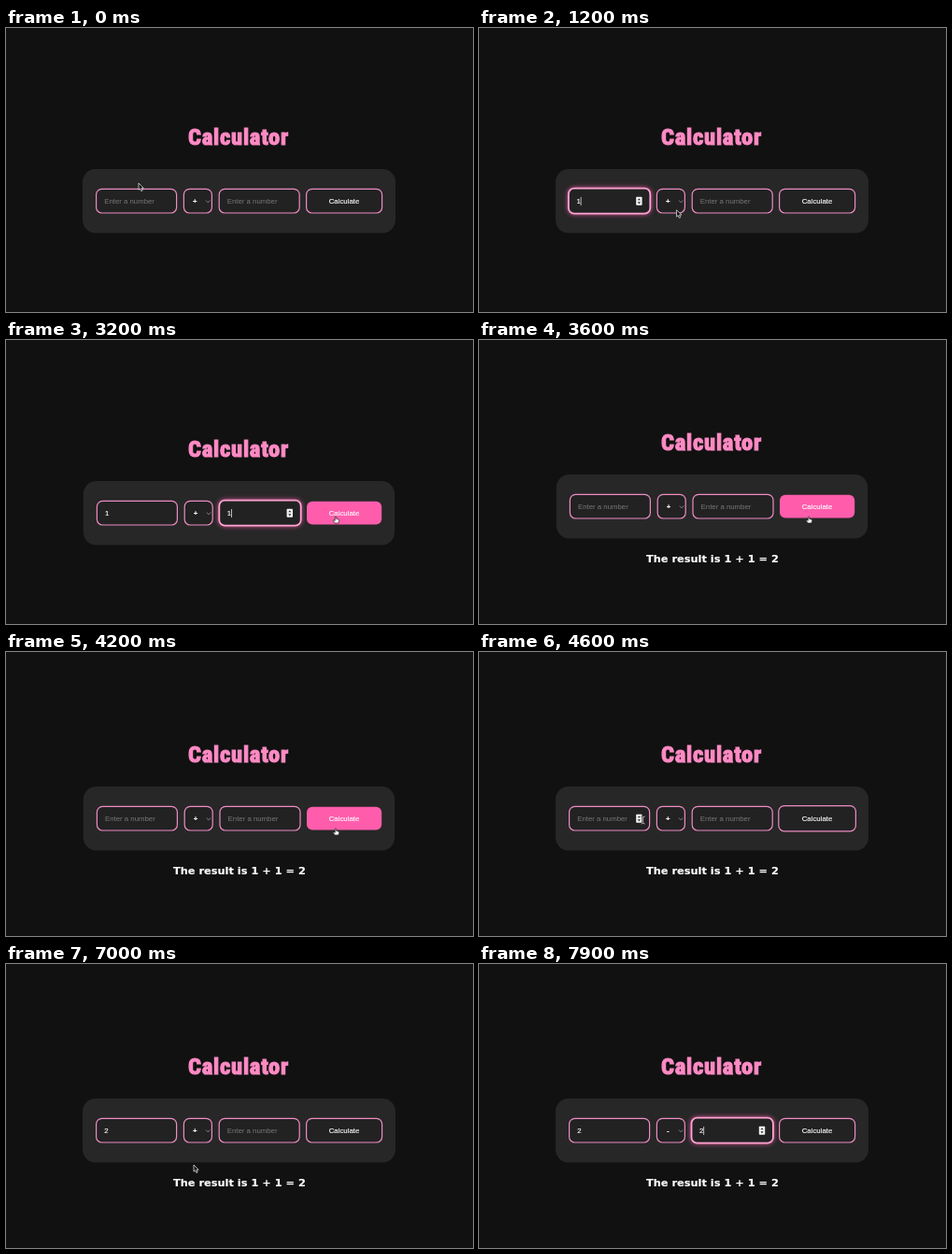
These frames come from a looping animation (500x304 px, 8 s). An HTML page:

```html
<!DOCTYPE html>
<html lang="en">
<head>
<meta charset="utf-8">
<title>Calculator</title>
<style>
  html, body { margin: 0; width: 100%; height: 100%; overflow: hidden; background: #111; }
  svg { display: block; width: 500px; height: 304px; }
  text { font: 7.8px "Liberation Sans", Arial, sans-serif; fill: #fff; stroke: #fff; stroke-width: .15; white-space: pre; }
  .title {
    font: 900 24.5px Impact, Anton, "Roboto Condensed", Roboto, sans-serif; font-stretch: 75%;
    fill: #ff8ac4; stroke: #ff8ac4; stroke-width: 1.2;
  }
  .panel { fill: #272727; }
  .box { fill: #222; stroke: #ee8cc2; stroke-width: 1.2; }
  .hint { fill: #777; stroke: none; }
  .focus .box { stroke: #ffa3d3; stroke-width: 1.8; filter: drop-shadow(0 0 2.5px rgba(255, 95, 174, .8)); }
  .hover .box { fill: #ff5dac; stroke: none; }
  .mid { text-anchor: middle; }
  .op { font-weight: bold; }
  .result { font: bold 11.35px "DejaVu Sans", Verdana, sans-serif; text-anchor: middle; }
  .chevron { fill: none; stroke: #909090; stroke-width: .9; }
  .hide { display: none; }
</style>
</head>
<body>
<svg viewBox="0 0 500 304">
  <defs>
    <g id="spinner">
      <rect width="6.4" height="9" rx=".8" fill="#f2f2f2"/>
      <path d="M1.6 3.5 3.2 1.6 4.8 3.5zM1.6 5.5 3.2 7.4 4.8 5.5z" fill="#222"/>
    </g>
    <path id="bar" d="M-2-4Q0-4 0-2.6Q0-4 2-4M0-2.6V2.6M-2 4Q0 4 0 2.6Q0 4 2 4"/>
  </defs>
  <g id="app">
    <text class="title" id="title" x="195" y="125">Calculator</text>
    <rect class="panel" id="panel" y="151" height="68.5" rx="14"/>
    <g id="row">
      <g id="first"></g>
      <g>
        <rect class="box" x="190.4" y="172.4" width="30" height="25.6" rx="6"/>
        <text class="op mid" id="op" x="202.3" y="188"></text>
        <path class="chevron" d="M214 184.6l2.2 2.2 2.2-2.2"/>
      </g>
      <g id="second"></g>
    </g>
    <g id="button">
      <rect class="box" rx="6"/>
      <text class="mid" x="362" y="188">Calculate</text>
    </g>
  </g>
  <text class="result" id="result" x="250" y="238">The result is 1 + 1 = 2</text>
  <g id="pointer">
    <path id="arrow" d="M0 0v7.2l1.6-1.4 1.2 2.7 1.4-.6-1.2-2.6h2.2z" fill="#111" stroke="#ddd" stroke-width=".8"/>
    <g id="beam" fill="none">
      <use href="#bar" stroke="#111" stroke-width="1.8"/>
      <use href="#bar" stroke="#ddd" stroke-width=".8"/>
    </g>
    <path id="hand" d="M-.7 0Q0-.8.7 0V2.5L3 3.1Q4 3.5 3.7 4.8L2.9 7H-.9L-2.8 4.2Q-2.5 3.2-.7 4.3z" fill="#fff" stroke="#222" stroke-width=".7"/>
  </g>
</svg>
<script>
const LOOP = 8000, STEP = 100, BEAT = 900, GLIDE = 700;
const TOP = 172.4, HEIGHT = 25.6;
const $ = id => document.getElementById(id);
const show = (el, on) => el.classList.toggle('hide', !on);
const within = (t, from, to) => t >= from && t < to;

// the pointer glides to the next stop on every beat
const STOPS = [
  [163, 133], [130, 185], [213.5, 195], [346.5, 218], [353, 189],
  [353, 189], [135, 178], [198, 180], [201, 215], [262, 180]
];

function pointerAt(t) {
  const n = Math.floor((t + STEP) / BEAT);
  const k = Math.min(1, (t + 2 * STEP - n * BEAT) / GLIDE);
  const ease = 1 - (1 - k) ** 3;
  return STOPS[n].map((v, i) => v + (STOPS[n + 1][i] - v) * ease);
}

function setRect(el, x, y, width, height) {
  for (const [k, v] of Object.entries({ x, y, width, height })) el.setAttribute(k, v);
}

const setBox = (el, x, width, grow) =>
  setRect(el, x - grow, TOP - grow, width + 2 * grow, HEIGHT + 2 * grow);

function makeField(id, x) {
  const el = $(id);
  el.innerHTML = `<rect class="box" rx="6"/>
    <text class="hint" x="${x + 8.6}" y="188">Enter a number</text>
    <text class="value" y="188"></text>
    <rect class="caret" y="181" width=".8" height="9" fill="#ddd"/>
    <use href="#spinner" x="${x + 71.6}" y="180.8"/>`;
  const [box, hint, value, caret, spin] = el.children;
  return (text, focus, hover) => {
    setBox(box, x, 86, focus ? .7 : 0);
    el.classList.toggle('focus', focus);
    value.textContent = text;
    value.setAttribute('x', x + (focus ? 7.8 : 8.6));
    caret.setAttribute('x', x + 7.7 + text.length * 4.4);
    show(hint, !text);
    show(caret, focus);
    show(spin, focus || hover);
  };
}

const drawFirst = makeField('first', 96.6), drawSecond = makeField('second', 228.2);
const buttonBox = $('button').firstElementChild;

function draw(t) {
  const [x, y] = pointerAt(t);
  const done = t >= 3500, rise = done ? 7 : 0;
  const over = (from, to) => within(x, from, to) && within(y + rise, TOP, TOP + HEIGHT);
  const onFirst = over(96, 183), onSecond = over(228, 315), onButton = over(321, 403);

  $('app').setAttribute('transform', `translate(0 ${-rise})`);
  show($('result'), done);

  // the button drops its border on hover, so the panel shrinks around it
  const inset = onButton ? .8 : 0;
  setRect($('panel'), 82 + inset, 151, 335 - 2 * inset, 68.5);
  $('row').setAttribute('transform', `translate(${inset} 0)`);
  $('button').classList.toggle('hover', onButton);
  setBox(buttonBox, 321.6, 81, onButton ? -.4 : within(t, 3400, 5300) ? .8 : 0);

  const a = within(t, 900, 3500) ? '1' : t >= 5500 ? '2' : '';
  const b = within(t, 2000, 3500) ? '1' : t >= 7700 ? '2' : '';
  drawFirst(a, within(t, 300, 1800) || within(t, 5300, 6200), onFirst);
  drawSecond(b, within(t, 1800, 3400) || t >= 7400, onSecond);
  $('op').textContent = t >= 7100 ? '-' : '+';

  // typing hides a resting pointer
  show($('pointer'), t < 7700);
  $('pointer').setAttribute('transform', `translate(${x} ${y})`);
  show($('beam'), onFirst || onSecond);
  show($('hand'), onButton);
  show($('arrow'), !(onFirst || onSecond || onButton));
}

// track the heading evenly whichever condensed face is present
const title = $('title');
title.style.letterSpacing = (108 - title.getComputedTextLength()) / title.textContent.length + 'px';

const start = performance.now();
function frame() {
  const t = (performance.now() - start) % LOOP;
  draw(Math.floor(t / STEP) * STEP);
  requestAnimationFrame(frame);
}
frame();
</script>
</body>
</html>
```
